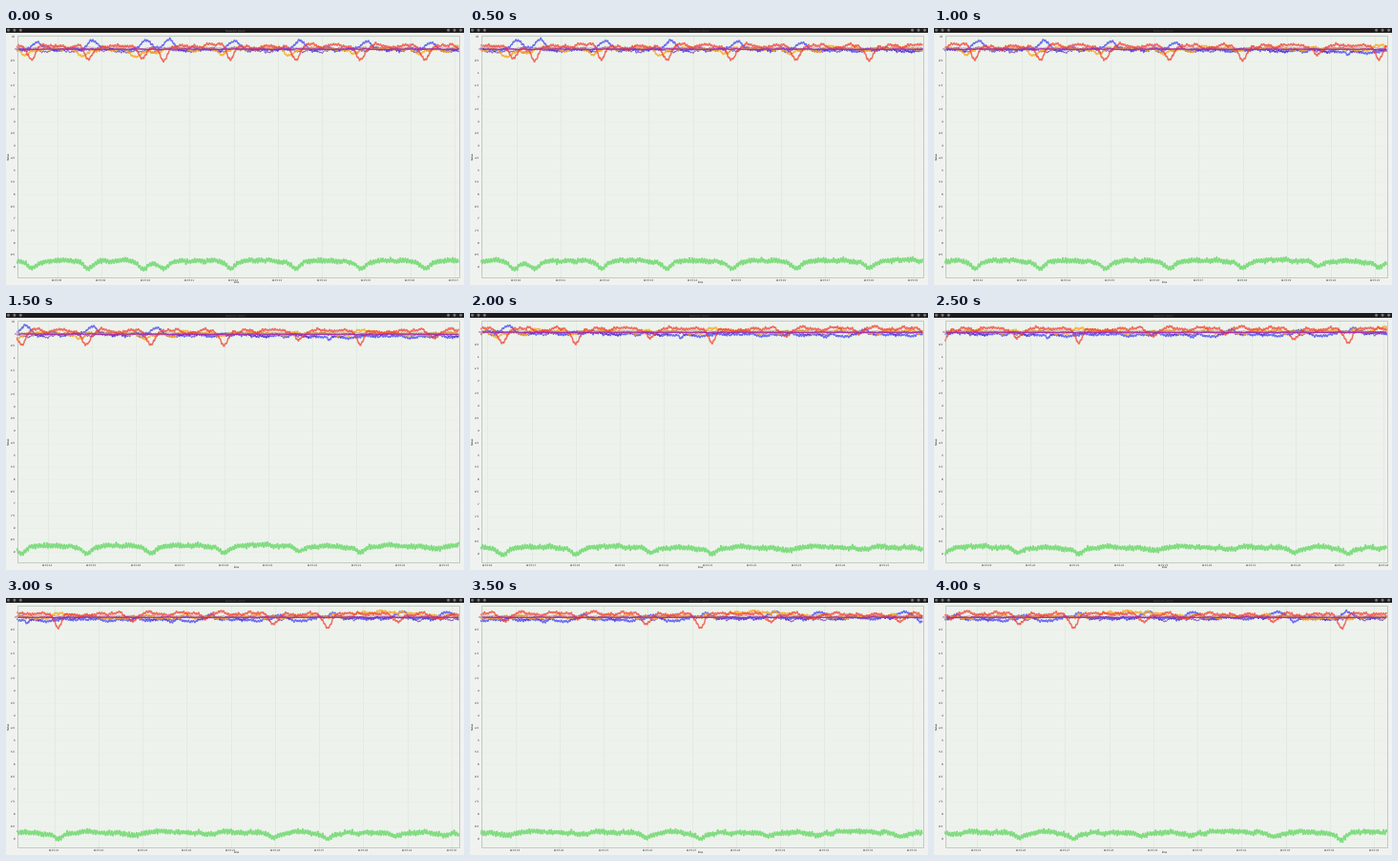
A matplotlib script for the animation above (4500 ms loop, 480 by 269 pixels).

```python
import numpy as np
import matplotlib
import matplotlib.pyplot as plt
from matplotlib.animation import FuncAnimation
from matplotlib.patches import Circle, Rectangle

W, H, DPI = 480, 269, 64
PX = 72 / DPI                              # points per pixel
LEFT, RIGHT, TOP, BOTTOM = 11.5, 474.5, 7.5, 261
SECOND = 46.25                             # pixels per second of the time axis
STEP = 0.25                                # sample spacing in pixels
FRAMES = 9

matplotlib.rcParams["font.family"] = "Liberation Sans"
matplotlib.rcParams["text.hinting"] = "none"
matplotlib.rcParams["path.simplify"] = False

rng = np.random.default_rng(12)
u = np.arange(0, 1285, STEP)


def scroll(i):
    """Steady scrolling with one late update that catches up quickly."""
    late = 32.5 * (1 - np.exp(-1.2 * max(i - 3, 0)))
    return 95 * i + 2.5 * min(i, 1) + late


def limits(i):
    """The value axis rescales once the tallest peaks have left."""
    return (.57, -9.43) if i < 4 else (.485, -9.36)


def bump(center, width):
    return np.exp(-((u - center) / width) ** 2)


def ramp(x, center, width=20):
    return 1 / (1 + np.exp(-(x - center) / width))


def drift(size, width):
    """Smooth random wander with the given spread."""
    k = np.hanning(int(width / STEP) + 3)
    n = np.convolve(rng.normal(size=u.size), k, "same")
    return size * n / n.std()


def texture(wander, ripple):
    """Slow and fast wander plus a zigzag dense enough to read as a band."""
    tri = 2 * np.abs(2 * ((u / 2.6) % 1) - 1) - 1
    return (drift(wander, 16) + drift(.6 * wander, 4)
            + ripple * (tri + rng.normal(0, .25, u.size)))


def depth(c):
    """Dips are even at first, then swell and fade in a slow wave."""
    wave = (1 - np.cos(2 * np.pi * (c - 659) / 282)) / 2
    return .52 - .36 * ramp(c, 550, 8) * wave ** .75


beats = [27, 86, 143, 165, 235, 304, 372, 440, 516, 595, 659, 738, 813,
         885, 941, 1014, 1062, 1150, 1222]

green = -8.74 + texture(.02, .08)
red = .12 + texture(.04, .035)
blue = -.04 - .08 * bump(770, 200) + texture(.035, .035)
orange = (.01 + .18 * bump(664, 13) + .2 * bump(1000, 40)
          + texture(.04, .03))
for c in beats:
    d = depth(c)
    w = 8 - 5 * d
    green -= .42 * d * bump(c, w) + .2 * d * bump(c, 2.6 * w)
    red -= (d + .04) * bump(c, w)
    lift = .36 * (1 - ramp(c, 480)) + .25 * ramp(c, 780)
    blue += lift * bump(c + 5, 8)
    orange -= .26 * (1 - ramp(c, 480)) * bump(c - 8, 7)
violet = -.04 + texture(.04, .025)
brown = .05 + texture(.015, .015)
flat = -.01 + texture(.005, .006)

# data, colour, line width, opacity
TRACES = [(blue, "#3a3af2", 1.4, .7), (violet, "#5a18a8", 1, .6),
          (orange, "#fba81c", 1.5, .8), (brown, "#a8805c", .8, .5),
          (red, "#f23c30", 1.5, .72), (green, "#5ad45a", 1.7, .72),
          (flat, "#a028b4", 1.4, .9)]

fig = plt.figure(figsize=(W / DPI, H / DPI), dpi=DPI, facecolor="#eff2ef")
ax = fig.add_axes([0, 0, 1, 1])
ax.set(xlim=(0, W), ylim=(H, 0))
ax.axis("off")


def label(x, y, s="", size=3.0, color="#383838", **kw):
    kw = {"ha": "center", "va": "center", **kw}
    return ax.text(x, y, s, fontsize=size * PX, color=color, **kw)


def box(x0, y0, x1, y1, **kw):
    return ax.add_patch(Rectangle((x0, y0), x1 - x0, y1 - y0, **kw))


def pool(n, color, width):
    return [ax.plot([], [], color=color, lw=width * PX, zorder=1)[0]
            for _ in range(n)]


box(LEFT, TOP, RIGHT, BOTTOM, fc="#edf3ec", ec="none", zorder=0)
box(LEFT, TOP, RIGHT, BOTTOM, fill=False, ec="#b4b8b4", lw=.7 * PX, zorder=6)
box(0, 0, W, 4.6, fc="#1c1c1c", ec="none", zorder=7)
for k in range(3):
    for x in (2.5 + 6.4 * k, 463.6 + 6.5 * k):
        ax.add_patch(Circle((x, 2.3), 1.5, fc="#767676", ec="none", zorder=8))
title = label(240, 2.3, "Network jitters", 3.3, zorder=8)
label(242.5, 266.4, "Time", 2.9, "#222222")
label(3, 134, "Value", 3.4, "#222222", rotation=90)

vgrid = pool(11, "#e1e7e0", .7)
hgrid = pool(20, "#e9efe8", .5)
times = [label(0, 263.8, size=2.9) for _ in vgrid]
values = [label(10.3, 0, f"{.5 - .5 * k:g}", ha="right")
          for k in range(len(hgrid))]
lines = [ax.plot([], [], color=c, lw=w * PX, alpha=a, zorder=3,
                 solid_joinstyle="round", solid_capstyle="butt")[0]
         for _, c, w, a in TRACES]


def place(grid, text, xs, ys, at, shown):
    grid.set_data(xs, ys)
    text.set_position(at)
    grid.set_visible(shown)
    text.set_visible(shown)


def draw(i):
    offset = scroll(i)
    high, low = limits(i)
    unit = (BOTTOM - TOP) / (high - low)

    def to_y(v):
        return TOP + unit * (high - v)

    title.set_color("#707070" if i == 0 else "#505050")

    first = int(np.ceil(10 + (LEFT + offset - 146) / SECOND))
    for k, (grid, text) in enumerate(zip(vgrid, times)):
        x = 146 + SECOND * (first + k - 10) - offset
        text.set_text(f"12:15:{first + k:02d}")
        place(grid, text, [x, x], [TOP, BOTTOM], (x, 263.8), x < RIGHT)

    for k, (grid, text) in enumerate(zip(hgrid, values)):
        y = to_y(.5 - .5 * k)
        place(grid, text, [LEFT, RIGHT], [y, y], (10.3, y),
              TOP + 1 < y < BOTTOM)

    x = u - offset
    view = (x >= LEFT) & (x <= RIGHT)
    for line, trace in zip(lines, TRACES):
        line.set_data(x[view], to_y(trace[0][view]))
    return [title, *vgrid, *hgrid, *times, *values, *lines]


anim = FuncAnimation(fig, draw, frames=FRAMES, interval=500,
                     init_func=lambda: draw(0), repeat=True, repeat_delay=0)
plt.show()
```
